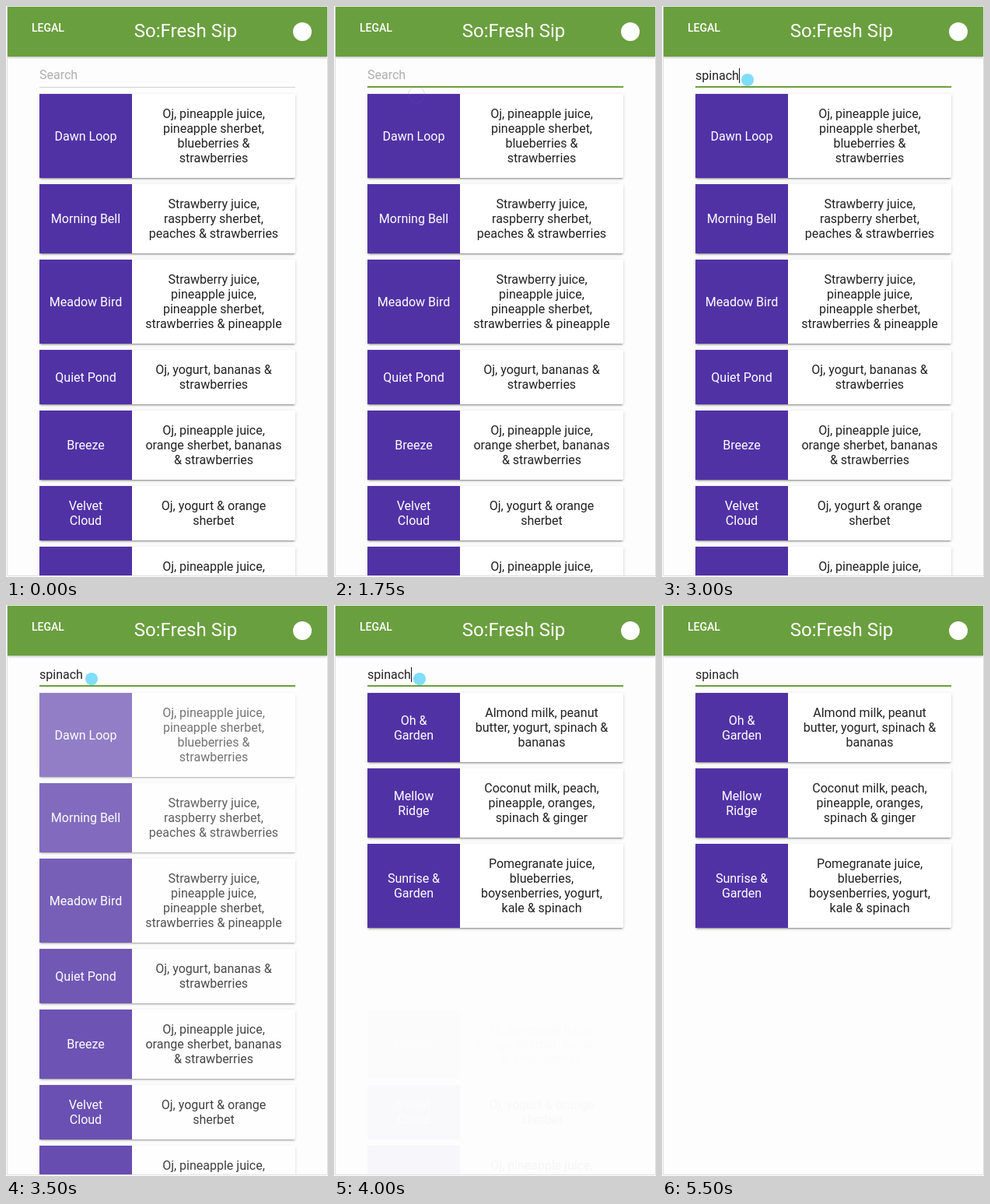
Animation, 414 px wide and 734 px high, one loop 5750 ms. Source, as an HTML page:

```html
<!DOCTYPE html>
<html lang="en">
<head>
<meta charset="utf-8">
<title>Juice search</title>
<style>
  html, body { margin: 0; width: 100%; height: 100%; overflow: hidden; background: #fff; }
  body { font: 16px/19px Roboto, Arial, sans-serif; color: #212121; }
  #stage { position: absolute; left: 0; top: 0; width: 414px; height: 734px; overflow: hidden; }
  #stage * { position: absolute; box-sizing: border-box; white-space: nowrap; }
  #page { left: 1px; top: 0; width: 413px; height: 733px; background: #fdfdfd;
    border: 1px solid #dedede; border-top-color: #e8efe2; }
  #view { left: 2px; top: 1px; width: 411px; height: 731px; overflow: hidden; }
  /* children of #view use stage coordinates */
  #origin { left: -2px; top: -1px; width: 414px; height: 734px; }
  header { left: 2px; top: 1px; width: 411px; height: 64px; background: #6a9f3f; color: #fff;
    box-shadow: 0 1px 3px rgba(0, 0, 0, .3); }
  .legal { left: 31px; top: 18px; font-size: 14px; font-weight: 500; }
  .title { left: 129px; width: 200px; top: 17px; font-size: 24px; line-height: 28px; text-align: center; }
  .badge { left: 367px; top: 20px; width: 24px; height: 24px; border-radius: 50%; background: #fff; }
  #hint { left: 43px; top: 79px; color: #aeaeae; }
  #typed { left: 43px; top: 80px; }
  #caret { width: 1px; height: 19px; top: 80px; background: #111; }
  #line { left: 43px; width: 329px; top: 104px; height: 1px; background: #d0d0d0; }
  #line.focus { top: 103px; height: 2px; background: #6a9f3f; }
  .card { left: 43px; width: 329px; border-radius: 2px; background: #fff;
    box-shadow: 0 2px 2px rgba(0, 0, 0, .14), 0 1px 5px rgba(0, 0, 0, .12), 0 3px 1px -2px rgba(0, 0, 0, .2); }
  .name, .mix { height: 100%; display: flex; align-items: center; justify-content: center; text-align: center; }
  .name { left: 0; width: 119px; background: #5132a5; color: #fff; }
  .mix { left: 119px; width: 210px; }
  .card #stage span, .card span { position: static !important; }
  #dot { width: 16px; height: 16px; margin: -8px; border-radius: 50%; background: #7fdcfb; }
  #ring { left: 95px; top: 104px; width: 22px; height: 22px; margin-top: -1px; border-radius: 50%;
    border: 1px solid #4a6fd0; }
</style>
</head>
<body>
<div id="stage">
  <div id="page"></div>
  <div id="view"><div id="origin">
    <header>
      <div class="legal">LEGAL</div>
      <div class="title">So:Fresh Sip</div>
      <div class="badge"></div>
    </header>
    <div id="hint">Search</div>
    <div id="typed"></div>
    <div id="line"></div>
    <div id="all"></div>
    <div id="found"></div>
    <div id="caret"></div>
    <div id="ring"></div>
    <div id="dot"></div>
  </div></div>
</div>
<script>
const STEP = 250, STEPS = 23;
const $ = id => document.getElementById(id);

const drinks = [
  ['Dawn Loop', 'Oj, pineapple juice,|pineapple sherbet,|blueberries &|strawberries'],
  ['Morning Bell', 'Strawberry juice,|raspberry sherbet,|peaches & strawberries'],
  ['Meadow Bird', 'Strawberry juice,|pineapple juice,|pineapple sherbet,|strawberries & pineapple'],
  ['Quiet Pond', 'Oj, yogurt, bananas &|strawberries'],
  ['Breeze', 'Oj, pineapple juice,|orange sherbet, bananas|& strawberries'],
  ['Velvet|Cloud', 'Oj, yogurt & orange|sherbet'],
  ['', 'Oj, pineapple juice,|orange sherbet|& bananas']
];
const matches = [
  ['Oh &|Garden', 'Almond milk, peanut|butter, yogurt, spinach &|bananas'],
  ['Mellow|Ridge', 'Coconut milk, peach,|pineapple, oranges,|spinach & ginger'],
  ['Sunrise &|Garden', 'Pomegranate juice,|blueberries,|boysenberries, yogurt,|kale & spinach']
];

function block(className, text) {
  const box = document.createElement('div'), span = document.createElement('span');
  box.className = className;
  span.style.whiteSpace = 'pre';
  span.textContent = text.replaceAll('|', '\n');
  box.append(span);
  return box;
}

function buildList(parent, items) {
  let top = 113;
  return items.map(([name, mix]) => {
    const card = document.createElement('div');
    const height = mix.split('|').length * 19 + 32;
    card.className = 'card';
    card.style.top = top + 'px';
    card.style.height = height + 'px';
    card.append(block('name', name), block('mix', mix));
    parent.append(card);
    top += height + 8;
    return card;
  });
}
const oldCards = buildList($('all'), drinks);
buildList($('found'), matches);

const path = { 1: [243, 30], 2: [178, 90], 3: [123, 97], 4: [117, 94], 5: [106, 115], 18: [172, 58] };
const between = (k, a, b) => k >= a && k <= b;

function pointer(k) {
  return between(k, 8, 17) ? [110, 95] : path[k];
}

function typedLength(k) {
  return k < 10 ? 0 : k === 10 ? 2 : k === 11 ? 5 : 7;
}

// Cards leave staggered from the top down
function oldOpacity(k, i) {
  if (k < 14) return 1;
  if (k > 16) return 0;
  const drop = [0, .72, .835][k - 14];
  return Math.max(0, .88 - .26 * Math.exp(-.45 * i) - drop);
}

const show = (el, on) => { el.style.visibility = on ? 'visible' : 'hidden'; };

function render(k) {
  const pos = pointer(k), length = typedLength(k);
  show($('dot'), pos);
  if (pos) {
    $('dot').style.left = pos[0] + 'px';
    $('dot').style.top = pos[1] + 'px';
  }
  show($('ring'), between(k, 6, 7));
  $('ring').style.opacity = k === 6 ? .6 : .22;
  $('line').className = k >= 6 ? 'focus' : '';

  show($('hint'), !length);
  $('typed').textContent = 'spinach'.slice(0, length);
  show($('caret'), between(k, 9, 13) || between(k, 16, 17) || between(k, 20, 21));
  $('caret').style.left = 43 + Math.round($('typed').getBoundingClientRect().width) + 'px';

  oldCards.forEach((card, i) => { card.style.opacity = oldOpacity(k, i); });
  $('found').style.opacity = k < 15 ? 0 : k === 15 ? .5 : 1;
}

const start = performance.now();
let last = -1;
function tick() {
  const k = Math.floor((performance.now() - start) / STEP) % STEPS;
  if (k !== last) render(last = k);
  requestAnimationFrame(tick);
}
tick();
</script>
</body>
</html>
```
